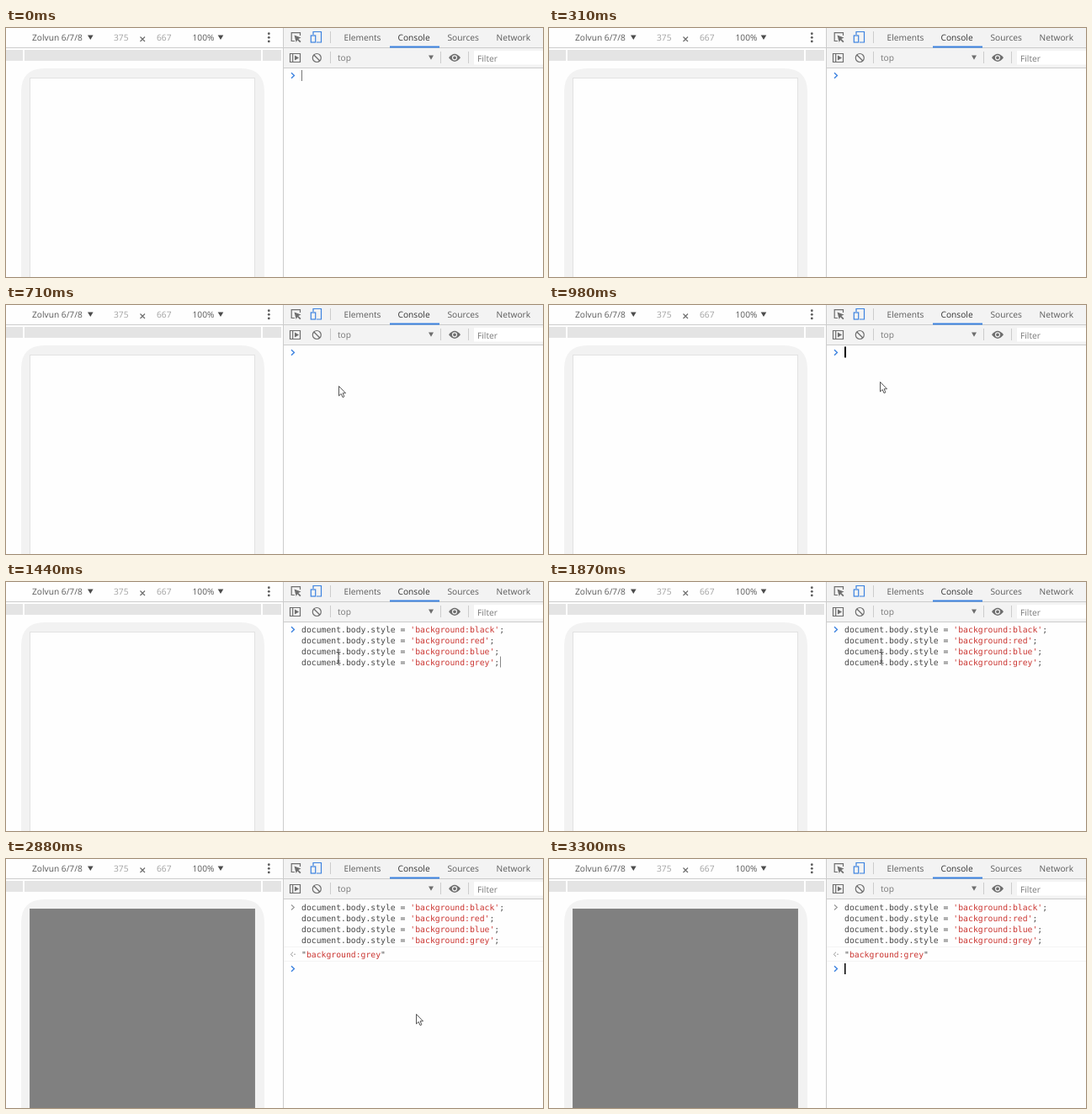
Write an HTML page that moves like this. It is 638 by 296 pixels and loops after 3420 ms.

```html
<!DOCTYPE html>
<html lang="en">
<head>
<meta charset="utf-8">
<title>Console demo</title>
<style>
html, body { margin: 0; width: 100%; height: 100%; overflow: hidden; background: #fefefe; }
svg { display: block; }
text { font: 10.2px "Open Sans", "Noto Sans", sans-serif; fill: #5a5a5a; white-space: pre; text-rendering: geometricPrecision; }
.dim { fill: #a0a0a0; }
.code text { font: 9.77px "DejaVu Sans Mono", "Noto Sans Mono", monospace; fill: #484848; }
.code .str { fill: #cb3632; }
.icon { fill: none; stroke: #6e6e6e; stroke-width: 1.2; }
.sep { stroke: #ccc; }
</style>
</head>
<body>
<svg width="638" height="296" viewBox="0 0 638 296">
  <rect width="638" height="296" fill="#fefefe"/>

  <!-- device toolbar -->
  <text x="31" y="15">Zolvun 6/7/8</text>
  <text class="dim" x="128" y="15">375</text>
  <path class="icon" d="M159.5 10.5l5.5 5.5m0-5.5l-5.5 5.5" stroke-width="1"/>
  <text class="dim" x="179" y="15">667</text>
  <text x="221.5" y="15">100%</text>
  <path d="M97 8.5h6.6l-3.3 5.5zM251.700 8.500h6.600l-3.300 5.500z" fill="#4c4c4c"/>
  <g fill="#5a5a5a"><circle cx="312.300" cy="6.700" r="1.400"/><circle cx="312.300" cy="11.300" r="1.400"/><circle cx="312.300" cy="15.900" r="1.400"/></g>
  <path class="sep" d="M0 23.500H329"/>
  <path d="M0 26H20V39H0zM22 26H303V39H22zM305 26H327V39H305z" fill="#e4e4e4"/>

  <!-- phone -->
  <path d="M18 296V76Q18 48 46 48H279Q307 48 307 76V296z" fill="#f2f2f2"/>
  <rect id="screen" x="28.500" y="59.500" width="267" height="260"/>

  <!-- tools panel -->
  <path d="M330 0H638V47H330z" fill="#f3f3f3"/>
  <path class="sep" d="M329.500 0V296M330 23.500H638M330 47.500H638M385.500 4V18M385.500 28V42M516.500 28V42M549.500 28V42"/>
  <rect x="456" y="21.500" width="59" height="2" fill="#3b82e0"/>
  <g id="tabs"></g>
  <path class="icon" d="M343 15.500H339.200V5.700H349.500V9"/>
  <path d="M342.500 8.500L350.500 11.500 347.300 12.900 350.500 16 349.200 17.200 346.200 14.200 344.700 17z" fill="#6e6e6e"/>
  <g class="icon" style="stroke:#3b82e0"><path d="M365 8V4.500H374.500V17H369"/><rect x="362.300" y="9" width="5.400" height="8"/></g>
  <path class="icon" d="M337.500 30.500H349.500V40.500H337.500zM340.700 30.500V40.500"/>
  <path d="M343 32.500L348 35.500 343 38.500z" fill="#6e6e6e"/>
  <g class="icon" stroke-width="1.500"><circle cx="369.300" cy="35.500" r="5"/><path d="M365.800 32L372.800 39"/></g>
  <text x="394" y="39" style="fill:#777">top</text>
  <path d="M502 32.500h6l-3 5.200z" fill="#6e6e6e"/>
  <path d="M526 35.300Q533 26 540 35.300Q533 44.600 526 35.300z" fill="#6e6e6e"/>
  <circle cx="533" cy="35.300" r="2.500" fill="#6e6e6e" stroke="#f3f3f3" stroke-width="1.200"/>
  <rect x="556" y="27" width="82" height="16.500" fill="#fff"/>
  <text x="560" y="40" style="fill:#777">Filter</text>

  <!-- console -->
  <g class="code">
    <g id="entry"></g>
    <g id="result">
      <path d="M330 104.500H638M330 121.500H638" stroke="#f4f4f4"/>
      <path d="M341 110.700L338.300 113.300 341 115.900" fill="none" stroke="#999"/>
      <circle cx="343" cy="113.300" r=".8" fill="#999"/>
      <text x="351" y="117">"<tspan class="str">background:grey</tspan>"</text>
      <path d="M339 54.500L342.300 57.500 339 60.500" fill="none" stroke="#999" stroke-width="1.200"/>
    </g>
  </g>
  <path id="prompt" d="M339 -3.200L342.400 0 339 3.200" fill="none" stroke="#3b82e0" stroke-width="1.400"/>
  <rect id="caret" height="13"/>
  <path id="arrow" d="M.5 .5V12L3.200 9.500 5 13.700 6.900 12.900 5.100 8.800H8.500z" fill="#fff" stroke="#444" stroke-width=".9"/>
  <path id="beam" d="M392.500 83.500H394.500L395 84 395.500 83.500H397.500M395 84V96M392.500 96.500H394.500L395 96 395.500 96.500H397.500" fill="none" stroke="#444"/>
</svg>
<script>
const LOOP = 3420, PASTE = 1440, RUN = 2310;
const $ = id => document.getElementById(id);
const show = (id, on) => $(id).setAttribute('visibility', on ? 'visible' : 'hidden');
const set = (id, attrs) => {
  for (const k in attrs) $(id).setAttribute(k, attrs[k]);
};

$('tabs').innerHTML = [['Elements', 401.500], ['Console', 465.500], ['Sources', 524.500], ['Network', 582.500]]
  .map(([name, x]) => `<text x="${x}" y="15"${name === 'Console' ? ' style="fill:#333"' : ''}>${name}</text>`).join('');

$('entry').innerHTML = ['black', 'red', 'blue', 'grey']
  .map((c, i) => `<text x="351" y="${60 + 13 * i}">document.body.style = <tspan class="str">'background:${c}'</tspan>;</text>`).join('');

// [start, x, y] of the pointer; no position means hidden
const pointer = [
  [0], [460, 430, 181], [580, 417, 134], [710, 395, 96], [860, 394, 93], [980, 393, 91],
  [PASTE], [RUN, 393, 91], [2880, 487, 184], [3000, 567, 264], [3150, 585, 284], [3300]
];

// [start, x, y, width, colour] of the caret
const caret = [
  [0, 351, 50, 1, '#777'], [310], [860, 351, 49.500, 2, '#000'],
  [PASTE, 587, 88.500, 1, '#888'], [1870],
  [RUN, 351, 124, 1, '#777'], [2740], [3300, 351, 124, 1.500, '#000']
];

const at = (steps, t) => steps.findLast(s => s[0] <= t);

function draw(t) {
  const ran = t >= RUN;
  set('screen', ran ? { fill: '#808080', stroke: '#858585' } : { fill: '#fefefe', stroke: '#e2e2e2' });
  show('entry', t >= PASTE);
  set('entry', { transform: `translate(0 ${ran ? 1 : 0})` });
  show('result', ran);
  set('prompt', { transform: `translate(0 ${ran ? 130.500 : 56.500})` });
  show('beam', t >= PASTE && !ran);

  const [, px, py] = at(pointer, t);
  show('arrow', px);
  if (px) set('arrow', { transform: `translate(${px} ${py})` });

  const [, x, y, width, fill] = at(caret, t);
  show('caret', x);
  if (x) set('caret', { x, y, width, fill });
}

const start = performance.now();
function tick() {
  draw((performance.now() - start) % LOOP);
  requestAnimationFrame(tick);
}
tick();
</script>
</body>
</html>
```
